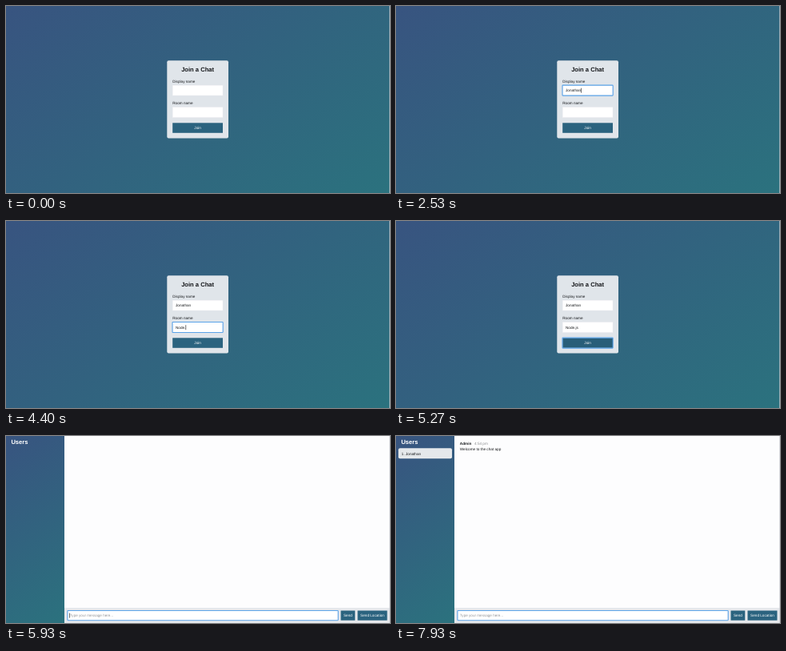
Write an HTML page that moves like this. It is 480 px wide and 234 px high and loops after 8000 ms.

```html
<!DOCTYPE html>
<html lang="en">
<head>
<meta charset="utf-8">
<title>Join a Chat</title>
<style>
  html, body { margin: 0; width: 100%; height: 100%; overflow: hidden; }
  .stage { position: relative; width: 480px; height: 234px; overflow: hidden; background: #fdfdfe; }
  .backdrop {
    position: absolute; inset: 0 auto 0 0; width: 480px;
    background: linear-gradient(325deg, #2b727e 0%, #385480 100%);
  }
  .in-chat .backdrop { width: 73px; }
  svg { position: absolute; inset: 0; }
  text {
    font: 4.67px "Liberation Sans", Arial, sans-serif;
    fill: #15171a; text-rendering: geometricPrecision; white-space: pre;
  }
  .title { font-size: 7.6px; font-weight: bold; }
  .bold { font-weight: bold; }
  .mid { text-anchor: middle; }
  .light { fill: #fff; }
  .muted { fill: #8b8d90; }
  .hint { fill: #94969a; font-size: 4.6px; }
  .button { fill: #2b637f; }
  .field { fill: #fff; stroke: #eaecef; stroke-width: .4; }
  .ring { fill: none; stroke: #5ba3e8; stroke-width: 1.1; }
  .caret { fill: #111; }
  #chat, .in-chat #join { display: none; }
  .in-chat #chat { display: inline; }
</style>
</head>
<body>
<div class="stage" id="stage">
  <div class="backdrop"></div>
  <svg width="480" height="234" viewBox="0 0 480 234">
    <g id="join">
      <rect x="201.3" y="68.2" width="76.7" height="97.3" rx="2" fill="#e0e5ea"/>
      <text class="title mid" x="239.6" y="82.3">Join a Chat</text>
      <text x="208.2" y="95.5">Display name</text>
      <rect class="field" x="208.2" y="99.2" width="62.8" height="12.8"/>
      <text id="name" x="212" y="107.4"></text>
      <text x="208.2" y="123.2">Room name</text>
      <rect class="field" x="208.2" y="126.6" width="62.8" height="12.8"/>
      <text id="room" x="212" y="134.9"></text>
      <rect class="button" id="submit" x="208.2" y="146.3" width="62.8" height="12.5"/>
      <text class="light mid" x="239.6" y="154.3">Join</text>
      <rect class="ring" id="ring" x="208" width="63.2" height="13" rx=".6"/>
    </g>
    <g id="chat">
      <text class="title light" x="6.4" y="10">Users</text>
      <g id="joined">
        <rect x="3" y="15.3" width="67" height="13" rx="2" fill="#e5e8eb"/>
        <text x="6.8" y="23.7">1. Jonathan</text>
        <text class="bold" x="79.8" y="10.8">Admin</text>
        <text class="muted" x="98" y="10.8">4:54 pm</text>
        <text x="79.8" y="18.1">Welcome to the chat app</text>
      </g>
      <rect x="73" y="215" width="407" height="19" fill="#e6e8ec"/>
      <rect class="field" x="77" y="218.6" width="338" height="12"/>
      <rect class="ring" x="76.9" y="218.5" width="338.3" height="12.2" rx=".6"/>
      <text class="hint" x="79.8" y="226.3">Type your message here...</text>
      <rect class="button" x="418.5" y="218.5" width="17.8" height="12.2"/>
      <text class="light mid" x="427.4" y="226.3">Send</text>
      <rect class="button" x="439.5" y="218.5" width="37" height="12.2"/>
      <text class="light mid" x="458" y="226.3">Send Location</text>
    </g>
    <rect class="caret" id="caret" width=".6" height="6"/>
    <rect x="479.3" width=".7" height="234" fill="#c9ccd2"/>
  </svg>
</div>
<script>
const LOOP = 8000, BLINK = 560;
const NAME_FOCUS = 870, ROOM_FOCUS = 2670, JOIN_FOCUS = 5200, ENTER = 5930, WELCOME = 6000;
const $ = id => document.getElementById(id);
const el = {};
for (const id of ['stage', 'name', 'room', 'submit', 'ring', 'joined', 'caret']) el[id] = $(id);

const fields = [
  { node: el.name, word: 'Jonathan', keys: [1730, 1870, 1930, 2070, 2200, 2270, 2400, 2470],
    from: NAME_FOCUS, to: ROOM_FOCUS, ringY: 99.1, caretY: 102.7 },
  { node: el.room, word: 'Node.js', keys: [3600, 3800, 3930, 4070, 4330, 4530, 4670],
    from: ROOM_FOCUS, to: JOIN_FOCUS, ringY: 126.5, caretY: 130.2 }
];

function place(node, attrs) {
  for (const key in attrs) node.setAttribute(key, attrs[key]);
}

function show(node, on) {
  node.style.visibility = on ? 'visible' : 'hidden';
}

// The caret is solid again after each key, then blinks.
function blink(since) {
  return Math.floor(since / BLINK) % 2 === 0;
}

function draw(t) {
  el.stage.classList.toggle('in-chat', t >= ENTER);
  show(el.joined, t >= WELCOME);
  show(el.ring, t >= NAME_FOCUS && t < ENTER);

  let caretOn = false;
  for (const f of fields) {
    const typed = f.keys.filter(k => k <= t).length;
    f.node.textContent = f.word.slice(0, typed);
    if (t < f.from || t >= f.to) continue;
    place(el.ring, { y: f.ringY });
    const width = typed ? f.node.getComputedTextLength() : 0;
    place(el.caret, { x: 212.1 + width, y: f.caretY });
    caretOn = blink(t - (typed ? f.keys[typed - 1] : f.from));
  }

  const press = Math.min(1, Math.max(0, (t - JOIN_FOCUS) / 300));
  const mix = (a, b) => Math.round(a + (b - a) * press);
  el.submit.style.fill = `rgb(${mix(43, 32)},${mix(99, 76)},${mix(127, 103)})`;
  if (t >= JOIN_FOCUS) place(el.ring, { y: 146.1 });

  if (t >= ENTER) {
    place(el.caret, { x: 79.4, y: 221.6 });
    caretOn = blink(t - ENTER);
  }
  show(el.caret, caretOn);
}

const start = performance.now();
function tick() {
  draw((performance.now() - start) % LOOP);
  requestAnimationFrame(tick);
}
tick();
</script>
</body>
</html>
```
